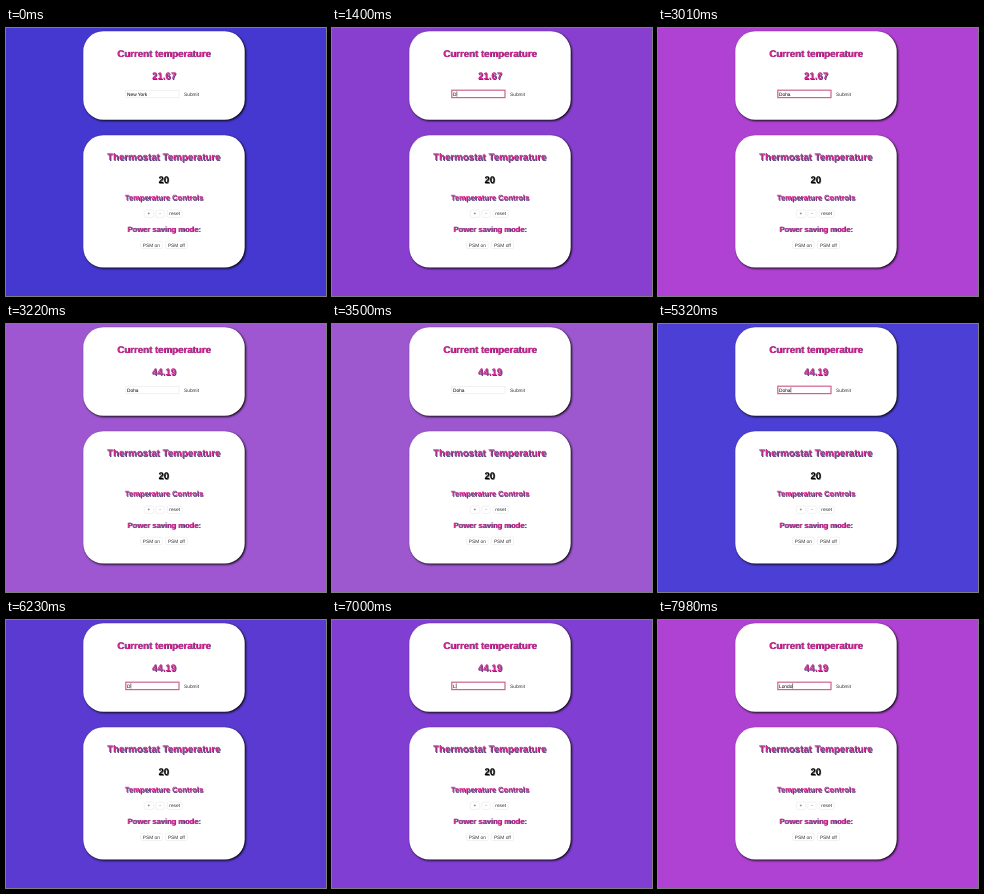
Write an HTML page that moves like this. It is 320 px wide and 268 px high and loops after 8 s.

```html
<!DOCTYPE html>
<html lang="en">
<head>
<meta charset="utf-8">
<title>Thermostat</title>
<style>
  html, body { margin: 0; width: 100%; height: 100%; overflow: hidden; }
  svg { display: block; width: 320px; height: 268px; }
  text { font-family: "Liberation Sans", Arial, sans-serif; text-rendering: geometricPrecision; }
  .card { fill: #fff; filter: drop-shadow(1.7px 1.7px 1.2px #000); }
  .title, .sub { font-weight: bold; text-anchor: middle; fill: #d0288f; text-shadow: .7px .7px .5px #54407c; }
  .title { font-size: 9.7px; }
  .sub { font-size: 7.55px; }
  .set { fill: #000; text-shadow: .5px .5px .5px #777; }
  .small { font-size: 4.8px; fill: #333; }
  .mid { text-anchor: middle; }
  .box { fill: #fff; stroke: #e2e2e2; stroke-width: .5; }
  #field.focus { stroke: #d0618f; stroke-width: 1.2; }
</style>
</head>
<body>
<svg id="stage" viewBox="0 0 320 268">
  <rect class="card" x="77.3" y="3.3" width="161.4" height="88.4" rx="20"/>
  <rect class="card" x="77.3" y="107.3" width="161.4" height="132.2" rx="20"/>

  <text class="title" x="157.8" y="28.8">Current temperature</text>
  <text class="title" id="temp" x="158" y="51.4"></text>
  <rect class="box" id="field" x="119.8" y="62.2" width="53.2" height="7.4"/>
  <text class="small" id="city" x="121" y="67.6" style="fill:#000"></text>
  <rect id="caret" y="63.3" width=".5" height="5.2"/>
  <text class="small mid" x="185.5" y="67.6">Submit</text>

  <text class="title" x="157.8" y="132">Thermostat Temperature</text>
  <text class="title set" x="157.8" y="155">20</text>
  <text class="sub" x="158" y="172">Temperature Controls</text>
  <text class="sub" x="158" y="203.6">Power saving mode:</text>
  <g id="buttons"></g>
</svg>
<script>
const $ = id => document.getElementById(id);
const LOOP = 8000;

// Buttons: label, left, width, top
$("buttons").innerHTML = [
  ["+", 138.3, 9.4, 182], ["-", 149.8, 8.4, 182], ["reset", 161.2, 15, 182],
  ["PSM on", 134.6, 21.6, 213.2], ["PSM off", 159.4, 22, 213.2]
].map(([label, x, w, y]) =>
  `<rect class="box" x="${x}" y="${y}" width="${w}" height="7.4" rx="1.5"/>
   <text class="small mid" x="${x + w / 2}" y="${y + 5.4}">${label}</text>`).join("");

const indigo = [69, 56, 208], orchid = [176, 66, 211],
      purple = [157, 88, 208], slate = [107, 99, 240];
const colors = [
  [0, indigo], [1400, [136, 63, 208]], [2250, orchid], [3010, orchid],
  [3230, purple], [3500, purple], [4380, slate], [4600, slate],
  [5460, indigo], [5810, indigo], [7960, orchid], [LOOP, orchid]
];

function background(t) {
  const i = colors.findIndex(([end]) => t < end);
  const [t0, a] = colors[i - 1], [t1, b] = colors[i];
  const k = (t - t0) / (t1 - t0);
  return `rgb(${a.map((v, n) => v + (b[n] - v) * k)})`;
}

// Typing: start, time per key, word, direction (-1 deletes)
const runs = [
  [700, 70, "New York", -1], [1330, 270, "Doha", 1],
  [5670, 245, "Doha", -1], [6860, 260, "London", 1]
];

function typed(t) {
  let text = "New York", lastKey = 0;
  for (const [start, step, word, dir] of runs) {
    if (t < start) break;
    const keys = Math.min(word.length, Math.floor((t - start) / step) + 1);
    text = word.slice(0, dir > 0 ? keys : word.length - keys);
    lastKey = start + (keys - 1) * step;
  }
  return { text, lastKey };
}

function draw(now) {
  const t = now % LOOP;
  const focus = t >= 560 && t < 3150 || t >= 5250;
  const { text, lastKey } = typed(t);
  const blink = (t - lastKey) % 1000 < 500;

  $("stage").style.background = background(t);
  $("temp").textContent = t < 3220 ? "21.67" : "44.19";
  $("city").textContent = text;
  $("field").classList.toggle("focus", focus);
  $("caret").setAttribute("x", 121.2 + (text ? $("city").getComputedTextLength() : 0));
  $("caret").setAttribute("visibility", focus && blink ? "visible" : "hidden");
}

const begin = performance.now();
function tick() {
  draw(performance.now() - begin);
  requestAnimationFrame(tick);
}
tick();
</script>
</body>
</html>
```
